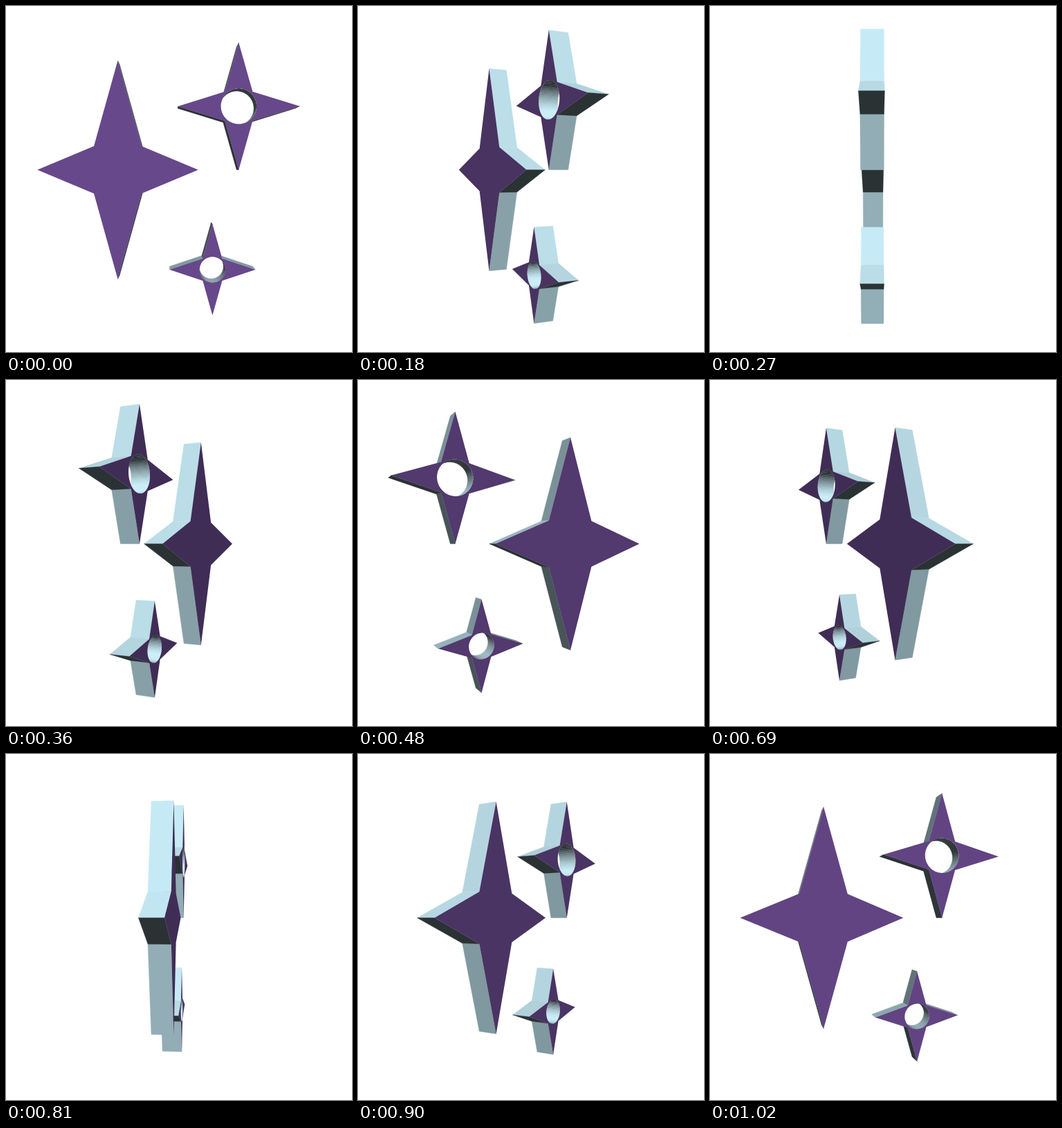
Recreate the animation shown at these times as an HTML page with a canvas. Size 500x500 px, loop 1050 ms.

```html
<!DOCTYPE html>
<html lang="en">
<head>
<meta charset="utf-8">
<title>Spinning stars</title>
<style>
  html, body { margin: 0; width: 100%; height: 100%; overflow: hidden; background: #fff; }
  canvas { display: block; width: 500px; height: 500px; }
</style>
</head>
<body>
<canvas id="stage" width="500" height="500"></canvas>
<script>
const ctx = document.getElementById('stage').getContext('2d');

const LOOP = 1050, STEP = 30, HALF = 18, STEPS = LOOP / STEP;
const CX = 234.7, CY = 236.7;       // vanishing point
const DIST = 890;                   // camera distance
const FRONT = 14.4, BACK = -15.6;   // faces along the depth axis
const WALL = [199, 236, 247], FACE = [103, 72, 138];

// x, y: centre; a, h: arm lengths; w, v: inner corner; r: hole radius
const stars = [
  { x: -72, y: 0, a: 114.5, h: 155.3, w: 33.9, v: 33.7, r: 0 },
  { x: 100, y: 90.3, a: 86.4, h: 90.3, w: 19.7, v: 20.7, r: 25.3 },
  { x: 62.7, y: -141.9, a: 61, h: 64.8, w: 13.8, v: 15.8, r: 18.2 }
];

// Brightness of the purple side by angle in degrees
const shine = [
  [0, 1], [30, .87], [61, .7], [95, .625], [125, .625], [161, .8], [180, .95],
  [205, .82], [234, .615], [290, .625], [320, .78], [350, .95], [362, 1]
];

function circle(s, n) {
  return Array.from({ length: n }, (_, i) => {
    const t = i / n * 2 * Math.PI;
    return [s.x + s.r * Math.cos(t), s.y + s.r * Math.sin(t)];
  });
}

for (const s of stars) {
  // counter-clockwise outline, y up
  s.rim = [[s.a, 0], [s.w, s.v], [0, s.h], [-s.w, s.v], [-s.a, 0], [-s.w, -s.v], [0, -s.h], [s.w, -s.v]]
    .map(([x, y]) => [s.x + x, s.y + y]);
  s.hole = s.r ? circle(s, 80).reverse() : [];
}

function lookup(table, x) {
  let i = 1;
  while (i < table.length - 1 && table[i][0] < x) i++;
  const [x0, y0] = table[i - 1], [x1, y1] = table[i];
  return y0 + (y1 - y0) * (x - x0) / (x1 - x0);
}

const tint = (rgb, b) => `rgb(${rgb.map(c => Math.round(c * b)).join(',')})`;

function angleAt(step) {
  const turn = step <= HALF ? step / HALF : 1 + (step - HALF) / (STEPS - HALF);
  return 0.5 + 180 * turn;
}

function wallLight(ny, nz) {
  return Math.min(1, Math.max(.21, .2 + .48 * ny + .98 * nz - .3 * nz * nz));
}

function trace(points) {
  points.forEach(([x, y], i) => i ? ctx.lineTo(x, y) : ctx.moveTo(x, y));
  ctx.closePath();
}

function area(points) {
  return points.reduce((sum, [x, y], i) => {
    const [p, q] = points[(i + 1) % points.length];
    return sum + x * q - p * y;
  }, 0);
}

function draw(step) {
  const deg = angleAt(step), rad = deg * Math.PI / 180;
  const cos = Math.cos(rad), sin = Math.sin(rad);

  const project = (x, y, z) => {
    const u = DIST / (DIST - x * sin - z * cos);
    return [CX + (x * cos - z * sin) * u, CY - y * u];
  };

  function walls(ring) {
    const list = [];
    ring.forEach(([x0, y0], i) => {
      const [x1, y1] = ring[(i + 1) % ring.length];
      const quad = [
        project(x0, y0, FRONT), project(x0, y0, BACK),
        project(x1, y1, BACK), project(x1, y1, FRONT)
      ];
      if (area(quad) >= 0) return;
      const len = Math.hypot(x1 - x0, y1 - y0);
      const light = wallLight((x0 - x1) / len, (y1 - y0) / len * sin);
      list.push({ quad, light, near: (x0 + x1) * sin });
    });
    list.sort((p, q) => p.near - q.near);
    for (const { quad, light } of list) {
      ctx.beginPath();
      trace(quad);
      ctx.fillStyle = ctx.strokeStyle = tint(WALL, light);
      ctx.fill();
      ctx.stroke();
    }
  }

  function face(s, z) {
    const flat = ring => ring.map(([x, y]) => project(x, y, z));
    const rim = flat(s.rim), hole = flat(s.hole);
    // the side turned away winds the other way on screen
    if ((area(rim) < 0) !== (z > 0)) return;

    // the inside of the hole shows only through its opening
    ctx.save();
    ctx.beginPath();
    trace(hole);
    ctx.clip();
    walls(s.hole);
    ctx.restore();

    ctx.beginPath();
    trace(rim);
    trace(hole);
    ctx.fillStyle = tint(FACE, lookup(shine, deg));
    ctx.fill('evenodd');
  }

  ctx.fillStyle = '#fff';
  ctx.fillRect(0, 0, 500, 500);
  ctx.lineWidth = .4;
  ctx.lineJoin = 'round';
  for (const s of [...stars].sort((p, q) => (p.x - q.x) * sin)) {
    walls(s.rim);
    face(s, FRONT);
    face(s, BACK);
  }
}

const start = performance.now();
function tick() {
  const t = performance.now() - start + 2;
  draw(Math.floor(t % LOOP / STEP));
  requestAnimationFrame(tick);
}
tick();
</script>
</body>
</html>
```
